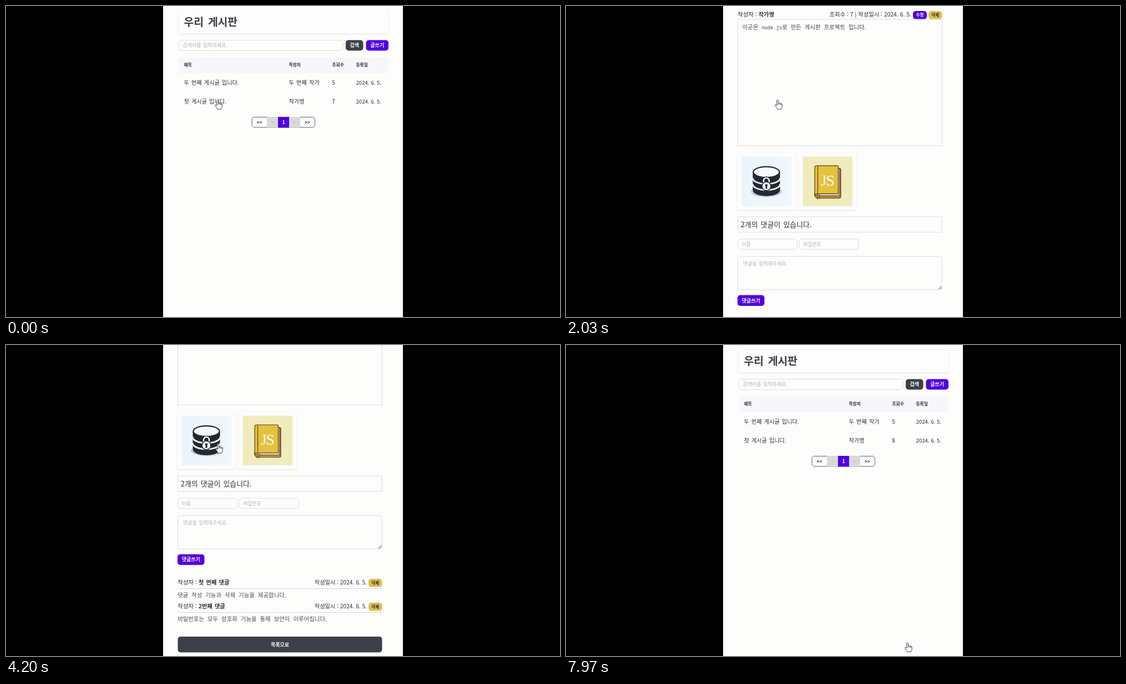
Write an HTML page that moves like this. It is 998 px wide and 561 px high and loops after 8 s.

```html
<!DOCTYPE html>
<html lang="ko">
<head>
<meta charset="utf-8">
<style>
html, body { margin: 0; height: 100%; overflow: hidden; background: #000; }
svg { display: block; width: 998px; height: 561px; }
text { font-family: "Noto Sans CJK KR", "Noto Sans CJK", sans-serif; white-space: pre; word-spacing: .13em; }
.mono { font-family: "Noto Sans Mono", monospace; font-size: 8.8px; }
.body { word-spacing: 3px; }
.tight { word-spacing: 0; }
.card { fill: #fdfdfd; filter: drop-shadow(0 1px 1px #0000281e); }
.box { fill: none; stroke: #dcdce0; }
</style>
</head>
<body>
<svg id="stage" viewBox="0 0 998 561"></svg>
<script>
const INK = '#2b2e38', GRAY = '#3d4049', PURPLE = '#5200e0', GOLD = '#dfbf4d', HINT = '#b2b2b8';

// Text is placed by its left edge (or anchor) and vertical centre.
const text = (x, y, size, str, { fill = INK, bold, anchor = 'start', cls = '', id = '' } = {}) =>
  `<text id="${id}" class="${cls}" x="${x}" y="${y + size * .37}" font-size="${size}" fill="${fill}"
    font-weight="${bold ? 700 : 400}" text-anchor="${anchor}">${str}</text>`;
const rect = (x, y, w, h, r, attrs) =>
  `<rect x="${x}" y="${y}" width="${w}" height="${h}" rx="${r}" ${attrs}/>`;
const card = (x, y, w, h) => rect(x, y, w, h, 2, 'class="card"');
const box = (x, y, w, h, r = 0) => rect(x, y, w, h, r, 'class="box"');
const button = (x, y, w, h, label, size, color, fill = '#fff', id = '') =>
  rect(x, y, w, h, 5, `fill="${color}" id="${id}"`) +
  text(x + w / 2, y + h / 2, size, label, { fill, bold: 1, anchor: 'middle' });
const field = (x, y, w, h, hint, size, hx, hy) =>
  box(x, y, w, h, 5) + text(hx, hy, size, hint, { fill: HINT });
const title = (x, y) => text(x, y, 19.3, '우리 게시판', { bold: 1, fill: '#3a3d47' });
const removeButton = y => button(653, y, 24.5, 14.8, '삭제', 7.5, GOLD, '#2a2a2c');
const author = (y, name) =>
  text(309, y, 10.5, '작성자 : ', { cls: 'tight' }) + text(346.8, y, 10.25, name, { bold: 1 });

function listPage() {
  const heads = [[320.5, '제목'], [509.5, '작성자'], [587.5, '조회수'], [630.5, '등록일']];
  const row = (y, name, writer, views, id) =>
    text(320.5, y, 10.15, name) + text(509.5, y, 10.2, writer) +
    text(587.2, y, 9.8, views, { id }) + text(630.5, y, 9.6, '2024. 6. 5.', { cls: 'tight' });
  const mark = (x, str, fill) => text(x, 210, 8.5, str, { fill, bold: 1, anchor: 'middle' });
  return card(311, 8, 378, 42) + title(320.5, 29) +
    field(311, 61.5, 296, 19, '검색어를 입력하세요.', 8.95, 318.5, 71) +
    button(612, 61.5, 31.5, 19, '검색', 9, GRAY) +
    button(648.5, 61.5, 40.5, 19, '글쓰기', 9, PURPLE) +
    rect(311, 92.5, 378, 28.5, 3, 'fill="#f7f7fb"') +
    heads.map(([x, s]) => text(x, 106.5, 7.7, s, { bold: 1 })).join('') +
    row(138, '두 번째 게시글 입니다.', '두 번째 작가', '5', '') +
    row(172, '첫 게시글 입니다.', '작가명', '7', 'views') +
    rect(443, 200.5, 113.5, 18.5, 4.5, 'fill="none" stroke="#5b5d66"') +
    rect(470, 200, 60, 19.5, 0, 'fill="#d9d9da"') +
    rect(490, 200, 20, 19.5, 0, `fill="${PURPLE}"`) +
    mark(456.5, '&lt;&lt;', INK) + mark(480, '&lt;', '#c0c0c2') + mark(500, '1', '#fff') +
    mark(520, '&gt;', '#c0c0c2') + mark(543, '&gt;&gt;', INK);
}

const database = () => `
  <ellipse cx="361" cy="400" rx="28" ry="10" fill="#c6cbd0"/>
  <path d="M336.5 365V397C336.5 412 385.5 412 385.5 397V365Z" fill="#212935"/>
  <path d="M336 375.5C338 390 384 390 386 375.5M336 386.5C338 401 384 401 386 386.5"
    fill="none" stroke="#f4f9fc" stroke-width="2.8"/>
  <ellipse cx="361" cy="365" rx="23.5" ry="9.7" fill="#f8fbfd" stroke="#212935" stroke-width="2.2"/>
  <path d="M356 384V380.5a5 5 0 0 1 10 0V384" fill="none" stroke="#212935" stroke-width="5"/>
  <path d="M356 384V380.5a5 5 0 0 1 10 0V384" fill="none" stroke="#fff" stroke-width="2.4"/>
  <circle cx="361" cy="390.5" r="8" fill="#fff" stroke="#212935" stroke-width="1.6"/>
  <circle cx="361" cy="389" r="2.3" fill="#212935"/><path d="M360 389h2l.8 6h-3.6z" fill="#212935"/>`;

const book = () => `
  <g stroke="#5a3d1c" stroke-width="1.2" stroke-linejoin="round">
    <path d="M452 358H492Q495 358 495 361V409Q495 412 492 412H454Q448 412 448 405Z" fill="#c99a35"/>
    <path d="M452 403H490V358H493V408H453Q450 407 450 404Z" fill="#d8d2c4"/>
    <path d="M448 405V357Q448 353.5 452 353.5H488Q490.500 353.5 490.500 356V404H453Q449 404 448 407Z" fill="#e3c23e"/>
    <path d="M453.500 354V404" fill="none"/>
    <path d="M453 406V414L455 411.500L457 413V406Z" fill="#b98a32" stroke-width=".8"/>
  </g>
  <text x="470.500" y="389" font-size="28" fill="#fff" text-anchor="middle"
    style="font-family:'Liberation Serif',serif;letter-spacing:-1.5px">JS</text>`;

function postPage() {
  const comment = (y, name, body) => author(y, name) +
    text(650, y, 10.2, '작성일시 : 2024. 6. 5.', { anchor: 'end', cls: 'tight' }) + removeButton(y - 6.2) +
    `<path d="M309 ${y + 11.5}H677.500" stroke="#d5d5da"/>` +
    text(309, y + 23.5, 10.45, body, { cls: 'body', fill: '#484b54' });
  return card(309, -8, 368, 41.5) + title(318.8, 12.5) +
    text(493.5, 53, 12.85, '첫 게시글 입니다.', { bold: 1, anchor: 'middle' }) +
    author(81, '작가명') +
    text(621.8, 81, 10.35, '조회수 : 7 | 작성일시 : 2024. 6. 5.', { anchor: 'end', cls: 'tight' }) +
    button(625, 74.4, 25, 14.8, '수정', 7.5, PURPLE) + removeButton(74.4) +
    box(309.5, 89.5, 367.5, 228) +
    text(317.5, 104, 10.45, '이곳은 <tspan class="mono">node.js</tspan>로 만든 게시판 프로젝트 입니다.',
      { cls: 'body', fill: '#3f424b' }) +
    card(309, 330, 104, 103.5) + card(419, 330, 104, 103.5) +
    rect(316.5, 337, 89.5, 89.5, 0, 'fill="url(#sky)"') + database() +
    rect(426.5, 337, 89.5, 89.5, 0, 'fill="#f0ecbd"') + book() +
    box(309.5, 445.5, 367.5, 28) +
    text(314.8, 460, 12.85, '2개의 댓글이 있습니다.') +
    field(309.5, 486, 107, 18.5, '이름', 8.7, 316.8, 495.5) +
    field(420, 486, 107, 18.5, '비밀번호', 8.7, 427.5, 495.5) +
    field(309.5, 517, 367.5, 60.5, '댓글을 입력해주세요.', 8.95, 319, 530.5) +
    '<path d="M670.500 576.500L676.500 570.500M673.500 576.500L676.500 573.500" stroke="#555"/>' +
    button(309, 587, 48.5, 19.3, '댓글쓰기', 9, PURPLE) +
    comment(637.5, '첫 번째 댓글', '댓글 작성 기능과 삭제 기능을 제공합니다.') +
    comment(680.5, '2번째 댓글', '비밀번호는 모두 암호화 기능을 통해 보안이 이루어집니다.') +
    button(309.5, 735.5, 368, 28.5, '목록으로', 9, GRAY, '#fff', 'back');
}

stage.innerHTML = `
  <defs><linearGradient id="sky"><stop stop-color="#eaf5fb"/><stop offset="1" stop-color="#eff8fa"/></linearGradient>
  <clipPath id="view"><rect x="283" width="432" height="561"/></clipPath></defs>
  <rect x="283" width="432" height="561" fill="#fdfdfc"/>
  <g clip-path="url(#view)"><g id="list">${listPage()}</g><g id="post">${postPage()}</g></g>
  <g id="cursor" stroke-linejoin="round" stroke-linecap="round">
    <path id="hand" fill="#fff" stroke="#33343a" stroke-width=".9" d="M-1.300 1.200Q0-.6 1.300 1.200V6.500Q2.500 5 4 6.700Q5.300 5.400 6.300 7.200Q8.200 6.500 8.200 8.800V12Q8.200 14 6.800 15.500V17H-.5V15.700Q-2.500 13.500-4.200 10.300Q-4.300 8.300-2.500 9L-1.300 10.500ZM1.300 6.500V9M4 6.700V9.200M6.300 7.200V9.500"/>
    <path id="beam" fill="none" stroke="#111" stroke-width="1.300" d="M-3.500-6.500H-1L0-5.700L1-6.500H3.500M0-5.700V5.700M-3.500 6.500H-1L0 5.700L1 6.500H3.500"/>
    <path id="arrow" fill="#fff" stroke="#222" d="M0 0V13L3 10.300L5 15L7 14L5 9.500H9Z"/>
  </g>`;

const $ = id => document.getElementById(id);
const show = (id, on) => $(id).setAttribute('display', on ? 'inline' : 'none');
const span = (t, a, b) => Math.min(1, Math.max(0, (t - a) / (b - a)));
const smooth = p => p * p * (3 - 2 * p);

// Three wheel notches, each easing out.
const scroll = t => [1614, 2025, 2285].reduce(
  (sum, start) => sum + 75.33 * (1 - (1 - span(t, start, start + 200)) ** 3), 0);

function pointer(t) {
  const p = span(t, 4175, 5870), q = 1 - p, r = smooth(span(t, 5870, 6400));
  return [q * q * 381 + 2 * p * q * 420 + p * p * 608 + 7 * r,
          q * q * 169 + 2 * p * q * 460 + p * p * 473 + 63.5 * r];
}

function pointerKind(t, x, y) {
  if (t < 4170 || y > 526 || (y < 217 && x < 406)) return 'hand';
  const onText = (y > 276 && y < 296 && x < 527) || (y > 307 && y < 368) ||
    (x > 558 && y > 421 && y < 480) || (y > 488 && y < 501 && x < 578);
  return onText ? 'beam' : 'arrow';
}

function draw(t) {
  const onPost = t >= 570 && t < 7370;
  show('post', onPost);
  show('list', !onPost);
  $('views').textContent = t < 570 ? 7 : 8;
  $('post').setAttribute('transform', `translate(0 ${16.5 - scroll(t)})`);
  const [x, y] = pointer(t), kind = pointerKind(t, x, y);
  $('cursor').setAttribute('transform', `translate(${x} ${y})`);
  for (const id of ['hand', 'beam', 'arrow']) show(id, id === kind);
  $('back').style.filter = `brightness(${1 - .12 * span(t, 6270, 6470)})`;
}

function tick(now) {
  draw(now % 8000);
  requestAnimationFrame(tick);
}
draw(0);
requestAnimationFrame(tick);
</script>
</body>
</html>
```
